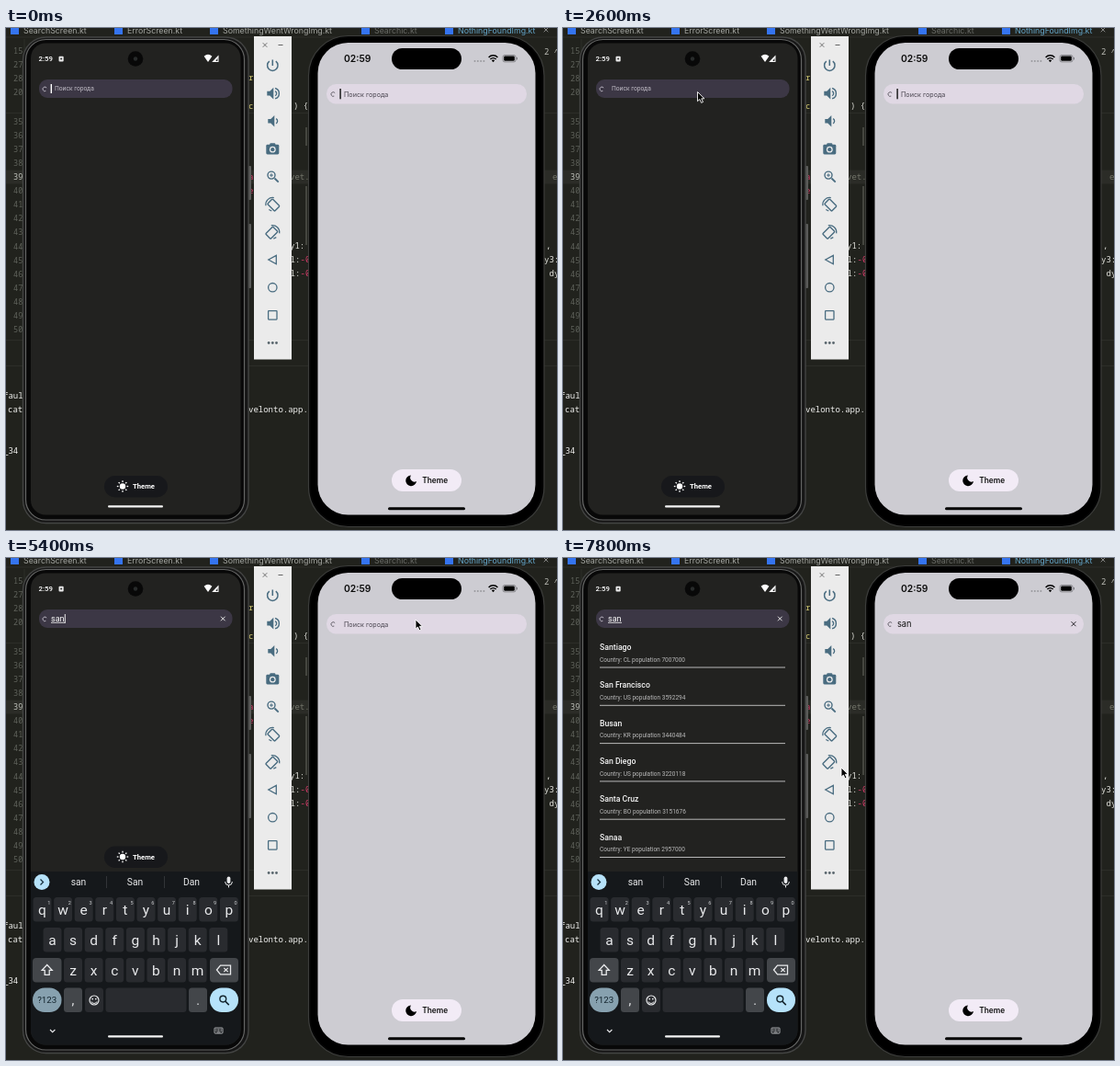
Recreate the animation shown at these times as an HTML page. Size 600 px wide and 546 px high, loop 8000 ms.

```html
<!DOCTYPE html>
<html lang="ru">
<head>
<meta charset="utf-8">
<title>City search on two phones</title>
<style>
html, body { margin: 0; width: 100%; height: 100%; overflow: hidden; background: #21221d; }
svg { display: block; width: 100vw; height: 100vh; }
text { white-space: pre; }
.inter { font-family: Inter, sans-serif; }
.roboto { font-family: Roboto, sans-serif; }
.mono { font-family: "Noto Sans Mono", "DejaVu Sans Mono", monospace; }
</style>
</head>
<body>
<svg id="stage" viewBox="0 0 600 546" xmlns="http://www.w3.org/2000/svg"></svg>
<script>
const LOOP = 8000, STEP = 200;

// Drawing helpers; text is placed by its vertical centre.
const text = (x, y, s, size, fill, font = 'roboto', extra = '') =>
  `<text x="${x}" y="${y + size * 0.36}" class="${font}" font-size="${size}" fill="${fill}" ${extra}>${s}</text>`;
const mid = (x, y, s, size, fill, font, extra = '') => text(x, y, s, size, fill, font, 'text-anchor="middle" ' + extra);
const rect = (x, y, w, h, fill, r = 0, extra = '') =>
  `<rect x="${x}" y="${y}" width="${w}" height="${h}" rx="${r}" fill="${fill}" ${extra}/>`;
const disc = (x, y, r, fill, extra = '') => `<circle cx="${x}" cy="${y}" r="${r}" fill="${fill}" ${extra}/>`;
const line = (d, color, w = 1, extra = '') =>
  `<path d="${d}" fill="none" stroke="${color}" stroke-width="${w}" ${extra}/>`;
const shape = (d, fill, extra = '') => `<path d="${d}" fill="${fill}" ${extra}/>`;
const group = (id, body, extra = '') => `<g id="${id}" ${extra}>${body}</g>`;
const at = (x, y, body, angle = 0) => `<g transform="translate(${x} ${y}) rotate(${angle})">${body}</g>`;
const cross = (x, y, r, color, w = 1) =>
  line(`M${x - r} ${y - r}l${2 * r} ${2 * r}m0 ${-2 * r}l${-2 * r} ${2 * r}`, color, w);
const searchGlyph = (x, y, color) => line(`M${x + 1.9} ${y - 1.3}A2.3 2.3 0 1 0 ${x + 1} ${y + 2.1}`, color, 0.9);
const wifi = (x, y, fill, r = 5) => shape(`M${x} ${y + r}L${x - r} ${y - r * 0.4}Q${x} ${y - r * 1.3} ${x + r} ${y - r * 0.4}Z`, fill);

function editor() {
  const tabs = [[19, 'SearchScreen.kt'], [132, 'ErrorScreen.kt'], [236, 'SomethingWentWrongImg.kt'],
    [401, 'Searchic.kt', '#686a66'], [492, 'NothingFoundImg.kt', '#63a5c9']];
  let s = rect(0, 0, 600, 546, '#21221d') + rect(0, 154.5, 600, 15, '#2b2c27');
  for (const [x, name, color = '#a3a5a0'] of tabs)
    s += rect(x - 14, -2, 9, 9, '#3574f0') + text(x, 2.7, name, 8.8, color, 'inter');
  s += cross(588, 2, 2.3, '#a0a0a0', 0.8) + line('M0 10H600M0 92.5H600', '#2c2d28') +
    line('M20 12V338', '#2d2e29');
  [15, 27, 28, 20].forEach((n, i) => s += text(8, 24.5 + i * 15.1, n, 8.6, '#5f625b', 'mono'));
  for (let n = 35; n <= 50; n++)
    s += text(8, 102 + (n - 35) * 15.05, n, 8.6, n === 39 ? '#c5c7c0' : '#5f625b', 'mono');
  const code = [
    [264, 54, 'r', '#d6cd74'], [264, 85, 'c', '#d6cd74'], [313, 85, ') {', '#d8d8d2'],
    [264, 162, 'a', '#d53c69'], [264, 177, 'e', '#d53c69'], [309, 162, 'vet.', '#74766b'], [595, 162, 'e', '#74766b'],
    [309, 237, 'y1:', '#e3e3dd'], [309.5, 252, 'l:', '#e3e3dd'], [309.5, 267, 'l:', '#e3e3dd'],
    [320.5, 252, '-0', '#d53c69'], [320.5, 267, '-0', '#d53c69'], [588, 237, ',', '#e3e3dd'],
    [586, 252, 'y3:', '#e3e3dd'], [591.5, 267, 'dy', '#e3e3dd'], [586, 26, '2 ^', '#b9bab4'],
    [-3, 400, 'faul', '#f2f2f0'], [2, 415, 'cat', '#f2f2f0'], [-3, 460, '_34', '#f2f2f0'],
    [264, 415, 'velonto.app.', '#f2f2f0']];
  for (const [x, y, str, color] of code) s += text(x, y, str, 9, color, 'mono', 'font-weight="500"');
  return s + line('M0 339.5H600M0 367.5H600', '#2c2d28') + line('M327 108v20m0 44v64', '#45463f', 2);
}

function toolbar() {
  const c = '#496c80';
  const speaker = 'M-6 -2.3h3l4 -4v12.6l-4 -4h-3z';
  const rotate = rect(-3.9, -5.6, 7.8, 11.2, 'none', 1, `stroke="${c}" stroke-width="1.4" transform="translate(1 .8) rotate(-45)"`) +
    line('M-7.4 1.5A7.6 7.6 0 0 1 1.5 -7.2', c, 1.2) + line('M-1 7.2l-3 -1.5', c, 1.2);
  const icons = [
    line('M-3.5 -4.8A5.7 5.7 0 1 0 3.5 -4.8M0 -6.5V0', c, 1.5),
    shape(speaker, c) + line('M2.8 -2.6a3 3 0 0 1 0 5.2M2.8 -5.6a5.8 5.8 0 0 1 0 11.2', c, 1.4),
    shape(speaker, c, 'transform="translate(1 0)"') + line('M3.8 -2.6a3 3 0 0 1 0 5.2', c, 1.4),
    rect(-7, -4.6, 14, 10.6, c, 1.4) + rect(-3, -6.3, 6, 3, c, 1) + disc(0, 0.7, 3.4, '#ebebeb') + disc(0, 0.7, 2.1, c),
    line('M2.2 1.9l4.2 4.2', c, 1.8) + disc(-1.3, -1.5, 4, 'none', `stroke="${c}" stroke-width="1.4"`) +
      line('M-3.2 -1.5h3.8M-1.3 -3.4v3.8', c, 1),
    rotate,
    `<g transform="scale(-1 1)">${rotate}</g>`,
    line('M4 -4.7V4.7L-4.5 0Z', c, 1.3),
    disc(0, 0, 4.7, 'none', `stroke="${c}" stroke-width="1.3"`),
    rect(-4.7, -4.7, 9.4, 9.4, 'none', 0.5, `stroke="${c}" stroke-width="1.3"`),
    [-4.2, 0, 4.2].map(x => disc(x, 0, 1.4, '#59666d')).join('')];
  return rect(270, 9, 41, 351.5, '#ebebeb') + cross(282, 18.5, 2.3, '#555', 0.8) + line('M296.5 18.5h5', '#555', 0.9) +
    icons.map((icon, i) => at(290.3, 41 + i * 30.15, icon)).join('');
}

function keyboard() {
  const white = '#e9eaec', dark = '#292b2f', grey = '#43464a', blue = '#b6e2fa';
  const pitch = 22.6;
  let s = rect(27, 341, 229, 192, '#15181b');
  s += disc(39, 352.5, 8.5, blue) + line('M37.5 349.5l3 3l-3 3', '#17303d', 1.3);
  s += rect(240.6, 346.5, 3.8, 7.5, white, 1.9) + line('M238.6 352a3.9 3.9 0 0 0 7.8 0M242.5 356v2.4', white, 1);
  s += group('suggestions', mid(79, 352.5, 'san', 10.3, white) + mid(140.5, 352.5, 'San', 10.3, white) +
    mid(202, 352.5, 'Dan', 10.3, white) + line('M109.5 346v13M172.5 346v13', '#3a3d41', 0.8));
  const row = (letters, x0, y, digits) => [...letters].forEach((ch, i) => {
    const x = x0 + i * pitch;
    s += rect(x - 10, y - 13, 20, 26.5, dark, 3.5) + mid(x, y, ch, 15.5, white);
    if (digits) s += mid(x + 7.3, y - 7.5, (i + 1) % 10, 5.6, '#cfd1d3');
  });
  row('qwertyuiop', 39.5, 382, true);
  row('asdfghjkl', 50.5, 415);
  row('zxcvbnm', 73, 448);
  s += rect(29, 435, 31.5, 26.5, grey, 4) + line('M44.7 442.5l-5.5 5.8h3v5h5v-5h3z', white, 1.3);
  s += rect(222, 435, 31, 26.5, grey, 4) + line('M229.5 448l4 -4.8h11v9.6h-11z', white, 1.3) + cross(239.5, 448, 2.2, white, 1.2);
  s += rect(29, 467.5, 31.5, 26.5, '#87a1af', 13) + mid(44.7, 481, '?123', 9.7, '#14252e');
  s += rect(63, 467.5, 20, 26.5, grey, 3.5) + mid(73, 481, ',', 14, white);
  s += rect(86, 467.5, 20, 26.5, dark, 3.5) + disc(96, 481, 5, 'none', `stroke="${white}" stroke-width="1.2"`) +
    disc(94.2, 479.6, 0.9, white) + disc(97.8, 479.6, 0.9, white) + line('M93 482.4a3.2 3.2 0 0 0 6 0', white, 1);
  s += rect(108.5, 467.5, 88, 26.5, dark, 3.5) + rect(199, 467.5, 20, 26.5, grey, 3.5) + mid(209, 481, '.', 14, white);
  s += rect(222, 467.5, 31, 26.5, blue, 13) + disc(236.3, 479.6, 3.4, 'none', 'stroke="#14252e" stroke-width="1.4"') +
    line('M238.8 482.1l4 4', '#14252e', 1.5);
  s += line('M48 513l2.7 2.7l2.7 -2.7', white, 1.1);
  s += rect(227, 511, 9, 6, 'none', 0.8, `stroke="${white}" stroke-width=".7"`) +
    line('M228.3 512.8h6.5M228.3 514.3h6.5', white, 0.8, 'stroke-dasharray=".9 .5"') + line('M229.5 516h4', white, 0.7);
  return s;
}

function cityList() {
  const cities = [['Santiago', 'CL', 7007000], ['San Francisco', 'US', 3592294], ['Busan', 'KR', 3440484],
    ['San Diego', 'US', 3220118], ['Santa Cruz', 'BO', 3151676], ['Sanaa', 'YE', 2957000]];
  return cities.map(([name, country, people], i) => at(40, 97 + i * 41.3,
    text(0, 0, name, 8.7, '#f4f4f4', 'roboto', 'font-weight="500"') +
    text(0, 13.5, `Country: ${country} population ${people}`, 6.5, '#b9b9b9') +
    line('M0 22H202', '#c9c9c9', 0.9))).join('');
}

function androidPhone() {
  const sun = disc(127, 498.5, 3.2, '#fff') + Array.from({length: 8}, (_, i) =>
    at(127, 498.5, line('M0 -4.5V-6.2', '#fff', 1.3), i * 45)).join('');
  return rect(264, 150, 3, 37, '#5a5b59', 1) + rect(264, 213, 3, 70, '#5a5b59', 1) +
    rect(18.5, 10, 245.5, 528.5, '#161616', 25, 'stroke="#434443" stroke-width="1.4"') +
    rect(21.5, 12.5, 238, 522.5, '#080808', 22, 'stroke="#646564" stroke-width="1.2"') +
    rect(27, 16.5, 228.5, 513, '#222220', 16) +
    disc(141, 33.5, 8.3, '#080808') + disc(141, 33.5, 2.2, '#282b2b') +
    text(35.5, 33.5, '2:59', 7.8, '#fff', 'roboto', 'font-weight="500"') +
    rect(57.5, 30.7, 5.2, 5.7, '#e8e8e8', 1) + disc(60.1, 33.5, 1, '#333') +
    wifi(220, 32.5, '#fff', 4.4) + shape('M231.5 29.5v7.5h-7.3z', '#fff') + shape('M230.4 32.5v3.6h-2z', '#222') +
    rect(36, 56, 210.5, 20, '#3c3745', 9) + searchGlyph(42.3, 66.4, '#c9c5d0') +
    group('droidHint', text(53, 66, 'Поиск города', 6.7, '#bfbbc5')) +
    text(49, 66, '', 9, '#fff', 'roboto', 'id="droidText"') +
    rect(0, 61, 1.3, 10, '#fff', 0, 'id="droidCaret"') +
    line('M49 70.3H64', '#fff', 0.8, 'id="underline"') +
    group('droidClear', cross(236.3, 66, 2.3, '#e8e8e8', 1)) +
    group('droidTheme', rect(107, 487, 69, 23.5, '#17181b', 11.7) + sun +
      text(138, 498.7, 'Theme', 7.7, '#fff', 'roboto', 'font-weight="600"')) +
    group('cities', cityList()) +
    line('M8.1 -8.1A11.5 11.5 0 1 1 -8.7 7.5', '#fff', 2, 'id="spinner"') +
    `<g clip-path="url(#droidClip)">${group('keyboard', keyboard())}</g>` +
    rect(111, 519.3, 60, 2.2, '#f4f4f4', 1.1);
}

function iosPhone() {
  return rect(329.5, 8.5, 256.5, 534, '#050505', 43, 'stroke="#3c3d3b" stroke-width="1.2"') +
    rect(332, 11, 251.5, 529, '#000', 40) +
    rect(339.5, 16, 237, 513.5, '#cdccd2', 33) + rect(420, 22, 76, 23, '#000', 11.5) +
    text(368, 33.3, '02:59', 10.3, '#0a0a0a', 'inter', 'font-weight="600"') +
    [510.5, 513.8, 517.1, 520.4].map(x => disc(x, 36, 1, '#9a999e')).join('') +
    line('M525.6 32a6.6 6.6 0 0 1 9.8 0M527.4 34a4.2 4.2 0 0 1 6.2 0', '#000', 1.4) + shape('M530.5 37.2l-1.7 -2q1.7 -1.3 3.4 0z', '#000') +
    rect(541, 29.5, 14, 7.4, 'none', 2, 'stroke="#77767b" stroke-width=".8"') + rect(542.2, 30.6, 11.6, 5.2, '#000', 1.2) +
    rect(555.9, 31.8, 1, 2.8, '#77767b', 0.5) +
    rect(349, 61, 218, 21.5, '#e0d8e4', 10.5) + searchGlyph(356.3, 72, '#59555e') +
    group('iosHint', text(368, 72, 'Поиск города', 7.2, '#49454f', 'inter')) +
    text(364, 72, '', 9.2, '#111', 'inter', 'id="iosText"') +
    rect(0, 66, 1.4, 11.3, '#111', 0, 'id="iosCaret"') +
    group('iosClear', cross(556, 71.7, 2.5, '#27242a', 1)) +
    group('paste', shape('M358.5 102l6.5 -6l6.5 6z', '#e3e1e6') + rect(350.5, 100.5, 38.5, 22, '#e3e1e6', 6) +
      mid(369.8, 111.5, 'Paste', 7.8, '#1a1a1a', 'inter'), 'filter="url(#soft)"') +
    rect(420, 480, 76, 24, '#f2ebf6', 12) +
    shape('M441 486.4A5.9 5.9 0 1 0 447 493A4.6 4.6 0 0 1 441 486.4Z', '#000') +
    text(453.3, 492.2, 'Theme', 8.3, '#0d0d0d', 'inter', 'font-weight="600"') +
    rect(416, 521.3, 84, 3, '#000', 1.5);
}

document.getElementById('stage').innerHTML =
  `<defs><clipPath id="droidClip">${rect(27, 16.5, 228.5, 513, '#000', 16)}</clipPath>
   <filter id="soft" x="-50%" y="-50%" width="200%" height="200%"><feDropShadow dx="0" dy="2" stdDeviation="5" flood-opacity=".18"/></filter></defs>` +
  editor() + toolbar() + androidPhone() + iosPhone() +
  shape('M0 0V10.2L2.4 8L4.1 11.8L6 11L4.3 7.3H7.5Z', '#000', 'id="pointer" stroke="#fff" stroke-width=".9"');

const el = id => document.getElementById(id);
const show = (id, on) => el(id).style.display = on ? '' : 'none';
const move = (id, x, y, extra = '') => el(id).setAttribute('transform', `translate(${x} ${y}) ${extra}`);
const progress = (t, from, to) => Math.min(1, Math.max(0, (t - from) / (to - from)));
const smooth = k => k * k * (3 - 2 * k);
const typed = (t, start) => 'san'.slice(0, Math.max(0, Math.floor((t - start) / STEP) + 1));

// Pointer stops: [start, end, x, y]; each leg eases to its stop.
const legs = [[0, 0, 215, 250], [400, 1000, 146.5, 69.5], [4600, 5200, 446, 67], [7200, 7800, 303, 228]];
function pointerAt(t) {
  let [, , x, y] = legs[0];
  for (const [from, to, tx, ty] of legs.slice(1)) {
    const k = smooth(progress(t, from, to));
    x += (tx - x) * k;
    y += (ty - y) * k;
  }
  return [x, y];
}

function field(name, word, startX, widths, caretOn, emptyX) {
  el(name + 'Text').textContent = word;
  show(name + 'Hint', !word);
  show(name + 'Clear', word);
  el(name + 'Caret').setAttribute('x', word ? startX + widths[word.length - 1] : emptyX);
  el(name + 'Caret').setAttribute('width', word ? 0.9 : 1.4);
  show(name + 'Caret', caretOn);
}

function render(t) {
  const phase = t % 1000;
  const droidCaret = phase < 500 || (t >= 3600 && t < 4400);
  const iosCaret = t >= 6200 ? t < 7400 : phase > 500 || phase < 100;
  field('droid', typed(t, 3600), 49, [4.8, 9.7, 14.8], droidCaret, 48.6);
  field('ios', typed(t, 6400), 364, [5, 10.3, 15.8], iosCaret, 363.4);

  const raised = smooth(progress(t, 3600, 4000));
  show('keyboard', raised);
  move('keyboard', 0, 191 * (1 - raised));
  move('droidTheme', 0, -173.5 * raised);
  show('suggestions', t >= 4400);
  show('underline', t >= 4400);

  const loading = t >= 6000 && t < 7000;
  show('droidTheme', t < 6000);
  show('spinner', loading);
  move('spinner', 142.3, 214, `rotate(${(t - 6400) * 0.27})`);
  show('cities', t >= 7000);
  show('paste', t >= 6000 && t < 6600);

  show('pointer', t >= 400);
  move('pointer', ...pointerAt(t));
}

function tick() {
  render(Math.floor(performance.now() % LOOP / STEP) * STEP);
  requestAnimationFrame(tick);
}
tick();
</script>
</body>
</html>
```
